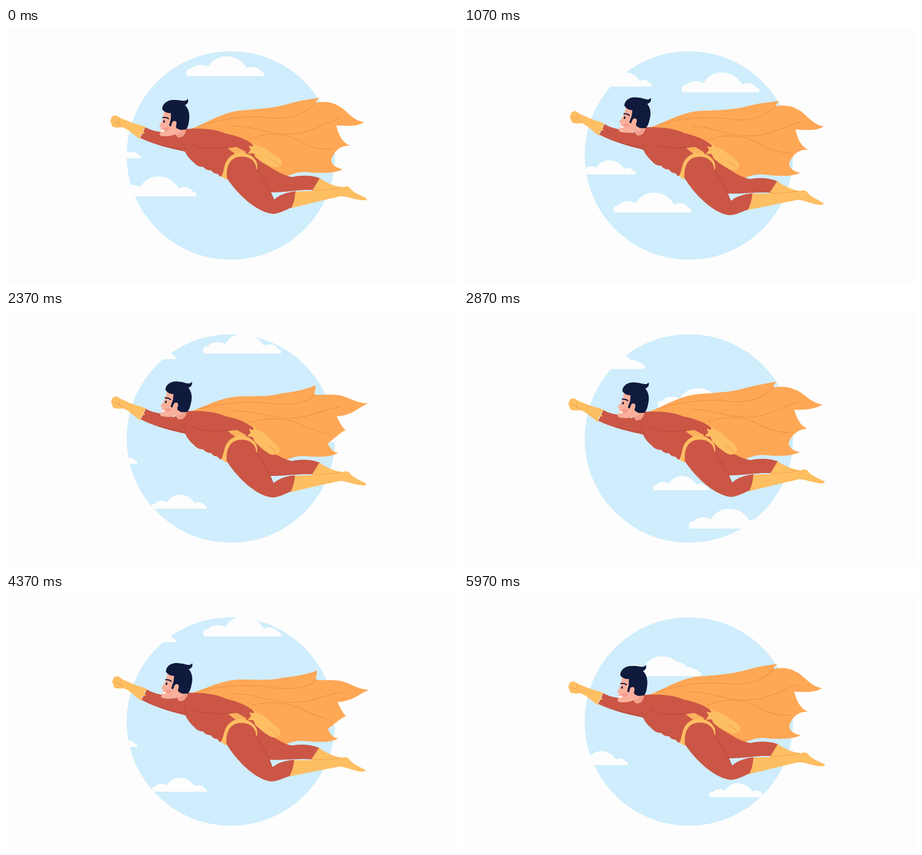
An HTML page for the animation above (6.01 s loop, 798 by 450 pixels).

```html
<!DOCTYPE html>
<html lang="en">
<head>
<meta charset="utf-8">
<title>Flying hero</title>
<style>
  html, body { margin: 0; width: 100%; height: 100%; overflow: hidden; background: #fdfdfd; }
  svg { display: block; width: 100vw; height: 100vh; }
  .sky { fill: #cfedfc; }
  .cloud { fill: #fdfdfd; }
  .cape { fill: #fea755; }
  .suit { fill: #cb5645; }
  .gold { fill: #febe62; }
  .amber { fill: #fbb25c; }
  .skin { fill: #f9b09c; }
  .hair { fill: #101a3c; }
  .line { fill: none; stroke-width: 1; stroke-linecap: round; stroke-linejoin: round; }
  .fold { stroke: #ea8e47; }
  .seam { stroke: #b3453c; }
  .crease { stroke: #eba04e; }
</style>
</head>
<body>
<svg viewBox="0 0 798 450">
  <defs>
    <clipPath id="disc"><circle cx="397" cy="225" r="184"/></clipPath>
    <path id="puff" d="M2 0C-3-8 2-13 9-13C13-20 30-23 39-16C45-28 58-35 71-35C88-35 100-26 107-14C117-19 129-15 131-9C137-8 139-3 137 0Z"/>
  </defs>

  <circle class="sky" cx="397" cy="225" r="184"/>
  <g clip-path="url(#disc)"><g id="clouds" class="cloud"></g></g>

  <g id="hero">
    <path id="cape" class="cape"/>
    <g id="folds" class="line fold"></g>

    <!-- far leg -->
    <path class="suit" d="M425 215L450 236C468 246 484 259 505 263C520 260 537 259 554 265L541 286C515 285 497 290 467 290L440 262Z"/>
    <path class="gold" d="M554 265C567 274 580 279 594 281L598 294L541 287Z"/>
    <path class="line crease" d="M554 265L548 276L541 287C558 286 574 286 592 281"/>

    <!-- near boot -->
    <path class="gold" d="M509 289C535 287 566 288 591 282C597 280 603 278 607 282C613 291 627 295 637 301Q638 304 630 304C614 303 602 296 590 297C560 304 535 310 503 318Z"/>

    <!-- torso and front sleeve -->
    <path class="suit" d="M246 175C258 183 279 183 295 189L318 178C342 177 366 177 387 186C406 190 424 195 436 206L440 225L425 242L386 263L378 262L373 257Q367 258 362 251Q354 252 348 245Q339 246 331 237C324 231 319 225 316 218C291 213 262 206 237 194Z"/>
    <path class="line seam" d="M330 206C346 214 365 213 397 211M316 218C317 213 316 209 312 204M270 205C284 211 299 212 312 214"/>

    <!-- belt and trunks -->
    <path class="amber" d="M391 212L407 210L424 219L417 226L403 221Z"/>
    <path class="gold" d="M380 262C387 253 382 235 400 224C415 215 437 222 443 238Q445 250 441 258L430 243L400 243L390 268Z"/>

    <!-- near leg -->
    <path class="suit" d="M390 265C388 242 397 227 415 227C432 226 442 237 442 249C453 265 464 280 473 303C483 294 495 290 511 288Q510 305 504 317C493 321 482 328 471 328C441 325 407 291 390 265Z"/>
    <path class="line seam" d="M442 249C453 265 464 280 473 303"/>

    <!-- resting hand -->
    <g id="hand">
      <path class="gold" d="M435 200L440 207C450 207 459 213 467 219C476 224 488 230 488 238C486 246 476 248 468 244C458 240 450 234 442 229L437 221L427 222L432 214L428 208L436 209Z"/>
      <path class="line crease" d="M466 231C474 235 480 239 483 242"/>
    </g>

    <!-- leading fist -->
    <path class="gold" d="M184 164L187 156L194 154L202 159C211 162 222 168 236 171L247 175L241 181L245 186L238 187L237 196C224 188 216 178 205 175C198 176 192 176 188 174Z"/>
    <path class="line crease" d="M200 160L198 168L190 165M198 168L204 173"/>

    <!-- head -->
    <g id="head">
      <path class="skin" d="M280 144C278 153 277 161 274 167L270 173L274 176L272 180L273 183L271 188Q272 191 278 191C286 191 293 191 298 187L304 193Q314 194 318 180L316 145Z"/>
      <path fill="#f29e8c" d="M298 187Q308 187 313 179L318 180Q315 193 307 193Z"/>
      <ellipse cx="284" cy="178" rx="5" ry="3" fill="#f59a8b"/>
      <path fill="#fff" d="M273 179L280 181Q276 185 273 182Z"/>
      <path class="hair" d="M276 144C275 134 285 126 298 127C308 126 316 132 321 125C323 131 320 134 316 136C323 143 325 153 323 164Q322 174 318 179L308 180L301 177L299 170Q298 164 294 166L291 174L288 172L291 160L291 150Q282 151 276 144Z"/>
      <path class="skin" d="M293 174C291 166 296 162 300 165C303 169 299 178 295 177Z"/>
      <path class="line" stroke="#101a3c" style="stroke-width:2" d="M277 158Q283 157 287 160"/>
      <ellipse class="hair" cx="279" cy="165" rx="1.5" ry="2.3"/>
    </g>
  </g>
</svg>
<script>
const LOOP = 6010, FRAMES = 180, CYCLE = 30;
const SPEED = [33, 14.2];
const $ = id => document.getElementById(id);

// Right end, base line and scale of each cloud, with the frame at which it sits there.
const clouds = [
  [0, 456, 85, 1], [0, 336, 297, 1], [0, 238, 230, .71], [0, 266, 75, .71],
  [11, 486, 75, 1], [11, 355, 349, .71], [11, 232, 270, .71], [11, 300, 85, .71],
  [26, 320, 101, .71], [26, 432, 316, .71], [26, 535, 384, 1], [26, 480, 171, 1],
  [29, 416, 145, 1], [29, 290, 302, .71]
];

// Each cape shape is a pair of paths to blend between.
const capeShape = [
  'M322 179C345 174 372 152 410 146C445 143 470 142 495 135C520 127 538 126 554 123C548 127 546 132 547 132C560 129 576 131 584 136C600 142 610 163 632 166C622 174 604 173 583 172C587 187 592 201 608 208C594 206 580 214 574 233C575 242 584 248 595 249C578 258 548 256 528 254C512 254 500 260 490 264L420 215Z',
  'M322 179C345 173 370 155 406 151C430 149 460 152 486 144C510 141 535 134 544 129C546 136 542 141 543 145C556 147 566 144 574 145C598 143 612 159 638 159C620 167 610 181 583 183C588 193 592 201 599 207C588 212 578 224 568 231C572 240 578 247 587 247C570 258 540 254 522 254C508 255 498 260 490 264L420 215Z'
];
const foldShapes = [
  ['M340 173C380 160 430 153 470 159C505 161 530 151 547 132',
   'M340 173C380 163 430 157 470 163C505 165 535 159 543 145'],
  ['M400 173C440 173 450 185 490 187C535 189 550 173 590 159',
   'M400 176C440 176 450 184 490 187C535 190 550 172 590 166'],
  ['M430 196C470 180 500 190 520 200C540 212 560 215 578 214',
   'M430 196C470 184 500 190 520 198C540 208 560 212 574 216']
];

function add(parent, tag) {
  return parent.appendChild(document.createElementNS('http://www.w3.org/2000/svg', tag));
}

function blend([a, b], k) {
  const to = b.match(/\d+/g);
  let i = 0;
  return a.replace(/\d+/g, n => (+n + (to[i++] - n) * k).toFixed(2));
}

const wave = x => (1 - Math.cos(2 * Math.PI * x)) / 2;
const turn = (id, angle, x, y) => $(id).setAttribute('transform', `rotate(${angle} ${x} ${y})`);

const puffs = clouds.map(() => {
  const puff = add($('clouds'), 'use');
  puff.setAttribute('href', '#puff');
  return puff;
});
const folds = foldShapes.map(() => add($('folds'), 'path'));

function draw(frame) {
  const phase = frame % CYCLE, part = frame / FRAMES;

  clouds.forEach(([at, right, base, size], i) => {
    const x = right + SPEED[0] * (phase - at) - 138 * size;
    const y = base + SPEED[1] * (phase - at);
    puffs[i].setAttribute('transform', `translate(${x} ${y}) scale(${size})`);
  });

  const flap = wave(phase / CYCLE) / .84;
  $('cape').setAttribute('d', blend(capeShape, flap));
  folds.forEach((fold, i) => fold.setAttribute('d', blend(foldShapes[i], flap)));

  turn('hero', 2.5 * wave(part * 2), 405, 240);
  turn('hand', 10 * wave(part), 432, 210);
  turn('head', 5.2 * Math.sin(Math.PI * part ** .6), 308, 186);
}

const start = performance.now();
function tick() {
  const time = (performance.now() - start) % LOOP;
  draw(Math.min(FRAMES - 1, Math.floor((time + 5) * .03)));
  requestAnimationFrame(tick);
}
tick();
</script>
</body>
</html>
```
